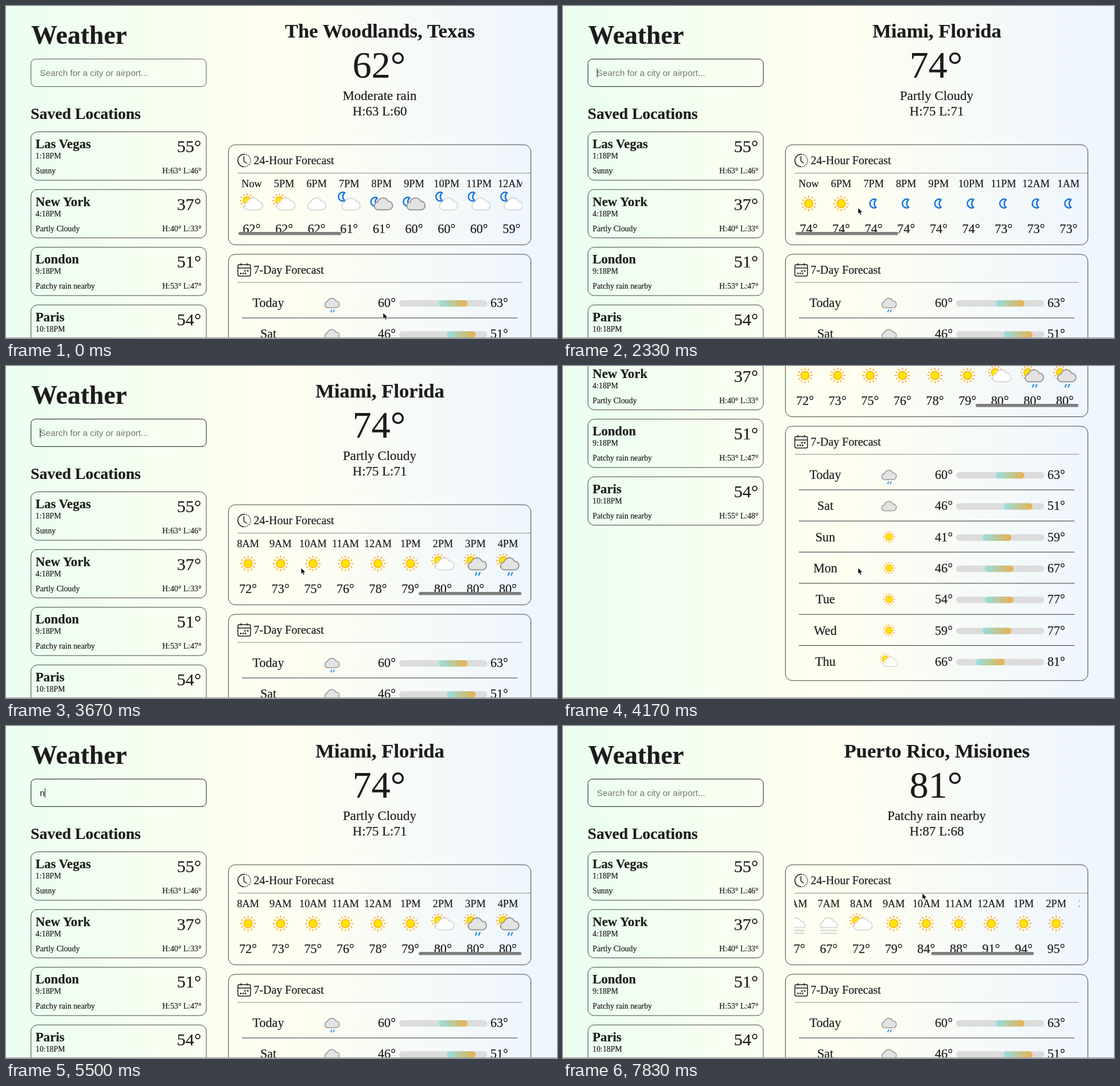
These frames come from a looping animation (960x579 px, 8 s). An HTML page:

```html
<!DOCTYPE html>
<html lang="en">
<head>
<meta charset="utf-8">
<title>Weather</title>
<style>
  html, body { margin: 0; width: 100%; height: 100%; overflow: hidden; }
  body { background: linear-gradient(to right, #ebfff0, #fffff0 50%, #edf5ff); }
  svg { display: block; width: 960px; height: 579px; }
  text {
    font-family: "Liberation Serif", "Times New Roman", serif;
    fill: #1c1c1c; stroke: #1c1c1c; stroke-width: .2; white-space: pre;
  }
  .sans { font-family: "Liberation Sans", Arial, sans-serif; stroke: none; }
  .box { fill: none; stroke: #444; }
  .thin { stroke: #8a8a8a; }
  .rule { stroke: #333; }
  .ink { fill: none; stroke: #1c1c1c; stroke-width: 1.5; }
</style>
</head>
<body>
<svg id="stage" viewBox="0 0 960 579"></svg>
<script>
const FPS = 6, LOOP = 8000, PITCH = 56.6, ROW_TRAVEL = 855.3, THUMB_TRAVEL = 314;

const text = (x, y, size, str, { anchor = 'start', bold = false, extra = '' } = {}) =>
  `<text x="${x}" y="${y}" font-size="${size}" text-anchor="${anchor}"` +
  `${bold ? ' font-weight="700"' : ''} ${extra}>${str}</text>`;
const mid = { anchor: 'middle' }, end = { anchor: 'end' }, bold = { bold: true };
const line = (x1, x2, y, cls) => `<path class="${cls}" d="M${x1} ${y}H${x2}"/>`;
const box = (x, y, w, h, r, extra = '') =>
  `<rect class="box" x="${x}" y="${y}" width="${w}" height="${h}" rx="${r}" ${extra}/>`;
const place = (x, y, content, scale = 1) =>
  `<g transform="translate(${x} ${y}) scale(${scale})">${content}</g>`;

// Weather icons, drawn around their own centre
const sun = (() => {
  let rays = '';
  for (let i = 0; i < 12; i++) {
    const a = i * Math.PI / 6, c = Math.cos(a), s = Math.sin(a);
    rays += `M${(c * 10).toFixed(1)} ${(s * 10).toFixed(1)}L${(c * 13.4).toFixed(1)} ${(s * 13.4).toFixed(1)}`;
  }
  return `<circle r="7.2" fill="#ffe600" stroke="#ffb020" stroke-width="1.8"/>
    <path d="${rays}" stroke="#ffb020" stroke-width="2"/>`;
})();
const moon = `<path d="M4.5 -6.8A7.6 7.6 0 1 0 4.5 6.8A8.5 8.5 0 0 1 4.5 -6.8Z"
  fill="#e6f3ff" stroke="#1976d8" stroke-width="2.4" stroke-linejoin="round"/>`;
const cloudShape = (fill, stroke) => `<path d="M-9.5 11a6.8 6.8 0 0 1 -.7 -13.4A10 10 0 0 1 8.4 -4
  A7.5 7.5 0 0 1 9 11Z" fill="${fill}" stroke="${stroke}" stroke-width="2"/>`;
const cloud = cloudShape('#fff', '#d9d9d9');
const greyCloud = cloudShape('#e3e3e3', '#9a9a9a');
const rain = '<path d="M-.5 15l-2.5 6M5 15l-2.5 6" stroke="#2f8de0" stroke-width="2.3"/>';
const smallSun = place(-8, -5, sun, .95);
const icons = {
  s: sun,
  n: moon,
  c: cloud,
  g: greyCloud,
  d: greyCloud + rain,
  p: smallSun + place(3, 0, cloud),
  r: smallSun + place(3, 0, greyCloud + rain),
  m: place(-12, -12, moon) + place(3, 0, cloud),
  o: place(-12, -3, moon) + place(3, 0, greyCloud),
  f: '<path d="M-14 7a6.6 6.6 0 0 1 3.8 -9.5A10 10 0 0 1 8.4 -4A7.2 7.2 0 0 1 14 7Z" fill="#fff" ' +
     'stroke="#d9d9d9" stroke-width="2"/><path d="M-15 12H15M-13 17H14" stroke="#d9d9d9" stroke-width="2.4"/>'
};

const cities = [
  { name: 'The Woodlands, Texas', temp: 62, sky: 'Moderate rain', range: 'H:63 L:60', start: 16,
    icons: 'ppcmoommmm', temps: '62 62 62 61 61 60 60 60 59 59' },
  { name: 'Miami, Florida', temp: 74, sky: 'Partly Cloudy', range: 'H:75 L:71', start: 17,
    icons: 'ssnnnnnnnnnnnnsssssssprr',
    temps: '74 74 74 74 74 74 73 73 73 73 72 72 72 72 72 72 73 75 76 78 79 80 80 80' },
  { name: 'Puerto Rico, Misiones', temp: 81, sky: 'Patchy rain nearby', range: 'H:87 L:68', start: 19,
    icons: 'rmmmnnnnnmmffpsssssssppp',
    temps: '81 79 76 74 73 72 71 70 69 68 67 67 67 72 79 84 88 91 94 95 95 94 92 89' }
];

const saved = [
  ['Las Vegas', '1:18PM', 'Sunny', 55, 63, 46],
  ['New York', '4:18PM', 'Partly Cloudy', 37, 40, 33],
  ['London', '9:18PM', 'Patchy rain nearby', 51, 53, 47],
  ['Paris', '10:18PM', 'Patchy rain nearby', 54, 55, 48]
];

// day, icon, low, high, left edge of the coloured range
const week = [
  ['Today', 'd', 60, 63, 754], ['Sat', 'g', 46, 51, 768], ['Sun', 's', 41, 59, 731],
  ['Mon', 's', 46, 67, 735], ['Tue', 's', 54, 77, 735], ['Wed', 's', 59, 77, 731],
  ['Thu', 'p', 66, 81, 720]
];

const hourLabel = (start, i) => {
  const h = (start + i) % 24;
  // the app labels noon as 12AM too
  return i === 0 ? 'Now' : (h % 12 || 12) + (h > 12 ? 'PM' : 'AM');
};

const cityHeader = c =>
  text(651.5, 55, 34.6, c.name, { ...mid, bold: true }) +
  text(650, 125.3, 66, c.temp + '°', mid) +
  text(651, 164, 22.9, c.sky, mid) +
  text(651, 190.5, 22.9, c.range, mid);

const cityHours = c => c.temps.split(' ').map((temp, i) => {
  const x = 428 + i * PITCH;
  return text(x, 316, 18.3, hourLabel(c.start, i), mid) +
    place(x, 344.5, icons[c.icons[i]]) + text(x, 395.5, 22.1, temp + '°', mid);
}).join('');

const savedCard = ([name, time, sky, temp, hi, lo], i) => place(0, i * 100.6,
  box(43.5, 219.5, 305.5, 84.3, 11) +
  text(51.5, 248, 22.7, name, bold) +
  text(51.5, 266, 13.8, time) +
  text(51.5, 292.3, 13.8, sky) +
  text(340, 255, 30.2, temp + '°', end) +
  text(340.5, 292.3, 13.8, `H:${hi}° L:${lo}°`, end));

const weekRow = ([day, icon, lo, hi, x], i) => place(0, i * 54.3,
  text(457, 525, 22.1, day, mid) +
  place(568, 517.5, icons[icon], .79) +
  text(679, 525, 22.1, lo + '°', end) +
  `<rect x="685" y="513" width="153.5" height="11.3" rx="5.6" fill="#dcdcdc"/>
   <rect x="${x}" y="513" width="50" height="11.3" rx="5.6" fill="url(#warmth)"/>` +
  text(844, 525, 22.1, hi + '°') +
  (i < week.length - 1 ? line(411, 891, 544, 'rule') : ''));

const clockIcon = `<g class="ink"><path d="M415 258.5a11 11 0 0 0 0 22"/>
  <path d="M415 258.5a11 11 0 0 1 0 22" stroke-dasharray="1.6 1.8"/><path d="M414.5 262v8.5l5 4"/></g>`;
const calendarIcon = `<g class="ink"><rect x="404" y="451" width="22" height="20" rx="2.5"/>
  <path d="M404 457H426M409.5 448.5v4M420.5 448.5v4"/>
  <path d="M415 462h2.5M420 462h2.5M408 466.5h2.5M412 466.5h2.5M416 466.5h2.5" stroke-width="2.4"/></g>`;

const stage = document.getElementById('stage');
stage.innerHTML = `
  <defs>
    <linearGradient id="warmth"><stop stop-color="#93e0e2"/><stop offset="1" stop-color="#e9b04f"/></linearGradient>
    <clipPath id="rowClip"><rect x="403" y="293" width="496.5" height="120"/></clipPath>
  </defs>
  <g id="page">
    ${text(44, 65.5, 45.5, 'Weather', bold)}
    ${box(43.5, 92.5, 305.5, 48, 8, 'id="field"')}
    ${text(59, 122, 15.3, '', { extra: 'class="sans" id="query"' })}
    <path id="caret" stroke="#1c1c1c"/>
    ${text(43, 196.5, 27.5, 'Saved Locations', bold)}
    ${saved.map(savedCard).join('')}
    <g id="header"></g>
    ${box(387.5, 242, 527, 174.5, 12)}
    ${clockIcon}${text(431.5, 276, 19.95, '24-Hour Forecast')}
    ${line(403.5, 914.5, 291.5, 'thin')}
    <g clip-path="url(#rowClip)"><g id="hours"></g></g>
    <rect id="thumb" y="394" width="179" height="5.6" rx="2.8" fill="#7f7f7f"/>
    ${box(387.5, 433, 527, 443.7, 12)}
    ${calendarIcon}${text(431.5, 467, 19.95, '7-Day Forecast')}
    ${line(403.5, 899, 482, 'thin')}
    ${week.map(weekRow).join('')}
  </g>
  <path d="M0 578.5H960" stroke="#9c9c9c"/>
  <path id="pointer" d="M0 0V10.8L2.5 8.6 4.3 12.6 6.2 11.8 4.5 8H8Z" fill="#000"
    stroke="#fff" stroke-width=".8"/>`;

const el = Object.fromEntries(['page', 'field', 'query', 'caret', 'header', 'hours', 'thumb', 'pointer']
  .map(id => [id, document.getElementById(id)]));

// Tracks hold [step, value] pairs; there are six steps a second
const pageTrack = [[22, 0], [23, 110], [24, 250], [25, 328], [26, 328], [27, 272], [28, 150], [29, 45], [30, 0]];
const rowTrack = [[14, 0], [15, 60], [17, 380], [19, 740], [21, ROW_TRAVEL], [40, ROW_TRAVEL],
  [41, 0], [43, 0], [45, 400], [46, 570], [47, 644.2]];
const pointerX = [[0, 657], [1, 630], [4, 220], [11, 220], [14, 514], [42, 514], [44, 626]];
const pointerY = [[0, 535], [1, 495], [4, 117], [11, 117], [14, 352], [42, 352], [44, 291.5]];
const typed = [[0, ''], [6, 'm'], [7, 'mi'], [8, 'mia'], [9, 'miam'], [10, 'miami'], [11, ''],
  [33, 'n'], [34, ''], [35, 'p'], [36, 'pu'], [37, 'puer'], [38, 'puerto'], [39, 'puerto r'],
  [40, 'puerto rico'], [41, '']];
const cityTrack = [[0, 0], [11, 1], [41, 2]];

const held = (track, k) => track.filter(([at]) => at <= k).pop()[1];
const tween = (track, k) => {
  const next = track.findIndex(([at]) => at > k);
  if (next < 0) return track[track.length - 1][1];
  if (next === 0) return track[0][1];
  const [a, from] = track[next - 1], [b, to] = track[next];
  return from + (to - from) * (k - a) / (b - a);
};

let shownCity = -1;
function draw(k) {
  const city = held(cityTrack, k);
  if (city !== shownCity) {
    shownCity = city;
    el.header.innerHTML = cityHeader(cities[city]);
    el.hours.innerHTML = cityHours(cities[city]);
  }
  const row = tween(rowTrack, k);
  el.page.setAttribute('transform', `translate(0 ${-tween(pageTrack, k)})`);
  el.hours.setAttribute('transform', `translate(${-row} 0)`);
  el.thumb.setAttribute('x', 405 + row / ROW_TRAVEL * THUMB_TRAVEL);

  const query = held(typed, k), focused = k >= 5;
  el.query.textContent = query || 'Search for a city or airport...';
  el.query.style.fill = query ? '#1c1c1c' : '#757575';
  el.field.style.stroke = focused ? '#1c1c1c' : '#555';
  const caretX = 59.5 + (query ? el.query.getComputedTextLength() : 0);
  el.caret.setAttribute('d', `M${caretX} 108.5V125`);
  const blinkOn = k % 6 >= 2 && k % 6 <= 4;
  el.caret.style.display = focused && (query || blinkOn) ? '' : 'none';

  const typing = (k >= 5 && k < 11) || (k >= 33 && k < 42);
  el.pointer.style.display = typing ? 'none' : '';
  el.pointer.setAttribute('transform', `translate(${tween(pointerX, k)} ${tween(pointerY, k)})`);
}

function tick() {
  const ms = performance.now() % LOOP;
  draw(Math.min(47, Math.floor((ms + 4) * FPS / 1000)));
  requestAnimationFrame(tick);
}
tick();
</script>
</body>
</html>
```
